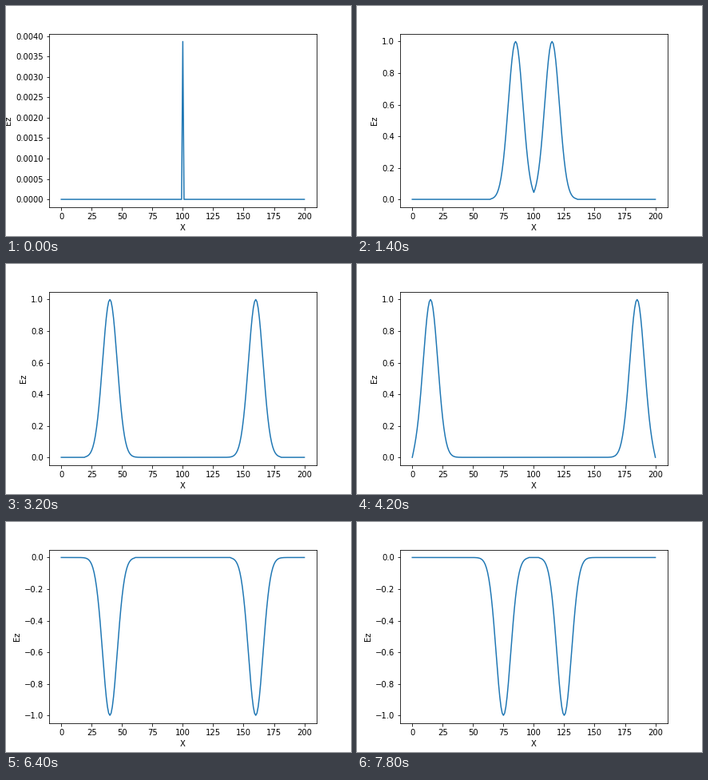
Write a matplotlib script that moves like this. It is 432x288 px and loops after 8000 ms.

```python
import numpy as np
import matplotlib.pyplot as plt
from matplotlib.animation import FuncAnimation

FRAMES = 40
INTERVAL = 200          # ms per frame
STEPS_PER_FRAME = 5     # the wave moves one cell per step
LENGTH = 200
SOURCE = LENGTH // 2
PEAK_STEP = 20
SPREAD = 6

plt.rcParams.update({
    "font.family": "DejaVu Sans",
    "font.size": 10,
    "figure.subplot.bottom": 0.125,
})

fig, ax = plt.subplots(figsize=(6, 4), dpi=72)
x = np.arange(LENGTH + 1)
dist = np.abs(x - SOURCE)


def pulse(step):
    """Gaussian source, switched on at step 0."""
    value = np.exp(-0.5 * ((step - PEAK_STEP) / SPREAD) ** 2)
    return np.where(step >= 0, value, 0.0)


def field(step):
    """Outgoing wave plus its inverted reflection from the fixed ends."""
    return pulse(step - dist) - pulse(step - (LENGTH - dist))


def draw(frame):
    ax.clear()
    line, = ax.plot(x, field(frame * STEPS_PER_FRAME))
    ax.set_xlabel("X")
    ax.set_ylabel("Ez")
    return line,


anim = FuncAnimation(fig, draw, frames=FRAMES, interval=INTERVAL,
                     init_func=lambda: draw(0), repeat=True, repeat_delay=0)
plt.show()
```
